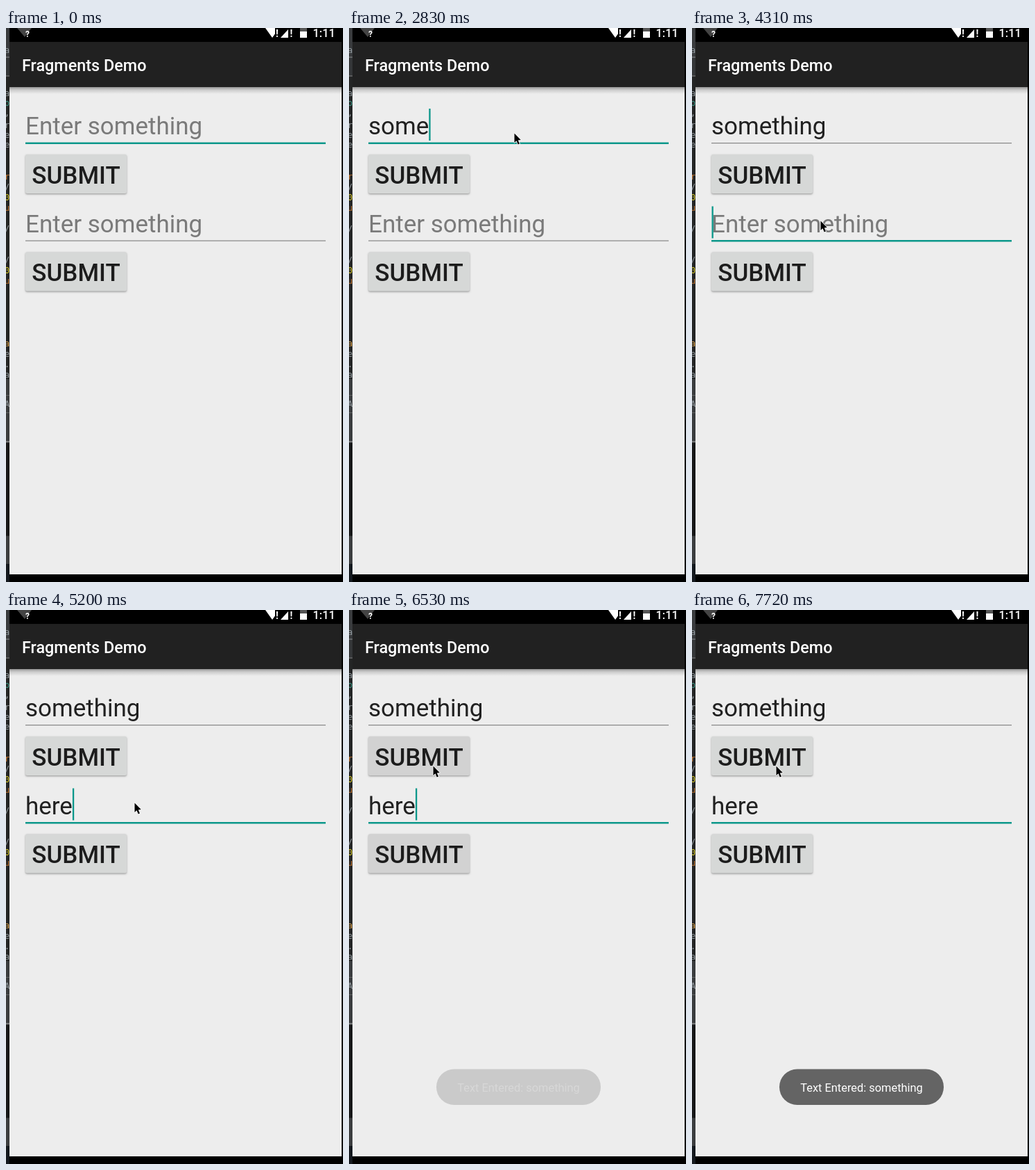
Write an HTML page with a canvas that moves like this. It is 486x797 px and loops after 8 s.

```html
<!DOCTYPE html>
<html lang="en">
<head>
<meta charset="utf-8">
<title>Fragments Demo</title>
<style>
  html, body { margin: 0; width: 100%; height: 100%; overflow: hidden; background: #000; }
  canvas { display: block; }
</style>
</head>
<body>
<canvas id="stage" width="486" height="797"></canvas>
<script>
const ctx = document.getElementById('stage').getContext('2d');
const LOOP = 8000;
const TEAL = '#0b978a';

// Step tracks: each entry holds from its time until the next one.
const pointer = [
  [0, null], [450, [317, 353]], [750, [298, 302]], [890, [258, 205]], [1040, [238, 151]],
  [3870, [226, 183]], [4020, [199, 246]], [4160, [185, 277]],
  [5790, [171, 262]], [5930, [136, 233]], [6080, [121, 224]]
];
const firstLength = [[0, 0], [2380, 1], [2530, 2], [2680, 3], [2830, 4], [2980, 6], [3120, 8], [3270, 9]];
const secondLength = [[0, 0], [4900, 1], [5050, 3], [5200, 4]];
const caretOn = [
  [0, false], [450, true], [890, false], [1340, true], [1940, false], [2380, true], [3720, false],
  [4310, true], [5640, false], [6080, true], [6680, false], [7130, true], [7720, false]
];
const toastAlpha = [[0, 0], [6530, 0.26], [6680, 0.66], [6830, 0.92], [6980, 1]];

const at = (track, t) => track.findLast(([start]) => start <= t)[1];

function rect(x, y, w, h, color) {
  ctx.fillStyle = color;
  ctx.fillRect(x, y, w, h);
}

function roundRect(x, y, w, h, r, color) {
  ctx.fillStyle = color;
  ctx.beginPath();
  ctx.roundRect(x, y, w, h, r);
  ctx.fill();
}

function polygon(points, color) {
  ctx.fillStyle = color;
  ctx.beginPath();
  points.forEach(([x, y]) => ctx.lineTo(x, y));
  ctx.closePath();
  ctx.fill();
}

function text(str, x, y, size, color, weight = 400, align = 'left', family = 'Roboto, sans-serif') {
  ctx.font = `${weight} ${size}px ${family}`;
  ctx.textAlign = align;
  ctx.fillStyle = color;
  ctx.fillText(str, x, y);
}

// Sliver of a code editor behind the phone window.
function drawEditor() {
  rect(0, 0, 5, 797, '#242525');
  rect(0, 0, 5, 41, '#393b3d');
  rect(0, 41, 5, 2, '#626466');
  rect(0, 43, 5, 25, '#343638');
  rect(0, 68, 5, 2, '#58595a');
  rect(0, 505, 5, 92, '#3a3c3e');
  rect(0, 528, 5, 1, '#606263');
  rect(0, 553, 5, 1, '#606263');
  rect(0, 594, 5, 2, '#747677');
  rect(0, 597, 5, 133, '#161718');
  rect(0, 731, 5, 40, '#3b3d3f');
  rect(0, 771, 5, 26, '#14191f');
  const gray = '#929a9f', orange = '#c77832', yellow = '#d2c52a';
  const glyphs = [
    ['a', 36, gray], ['a', 98, gray], ['o', 112, '#3c9a88'], [',', 126, gray], ['r', 144, gray],
    ['e', 158, gray], ['e', 172, gray], ['r', 218, orange], ['/', 233, gray], ['0', 248, yellow],
    ['u', 263, orange], ['/', 293, gray], ['/', 338, gray], ['0', 353, yellow], ['u', 368, orange],
    ['a', 458, '#d8a04c'], ['e', 473, gray], ['.', 488, gray], ['a', 503, gray], ['A', 545, gray]
  ];
  ctx.save();
  ctx.beginPath();
  ctx.rect(0, 0, 5, 797);
  ctx.clip();
  for (const [glyph, y, color] of glyphs) {
    text(glyph, -2, y, 12, color, 400, 'left', '"DejaVu Sans Mono", monospace');
  }
  ctx.restore();
}

function drawStatusBar() {
  rect(5, 0, 481, 20, '#000');
  polygon([[16, 0], [37, 0], [27, 13]], '#444');
  text('?', 28, 13, 12, '#fff', 700);
  polygon([[374, 0], [394, 0], [384, 14]], '#fff');
  rect(388, 0, 6, 14, '#000');
  text('!', 389, 13, 14, '#fff', 700);
  polygon([[407, 2], [407, 14], [396, 14]], '#fff');
  text('!', 409.5, 13, 14, '#fff', 700);
  rect(424, 0, 10, 5, '#555');
  rect(424, 5, 10, 9, '#fff');
  text('1:11', 442.5, 13, 16.4, '#fff', 500);
}

function drawField(y, value, focused, caret) {
  text(value || 'Enter something', 28, y + 37, 35, value ? '#212121' : '#7a7a7a');
  if (focused) rect(28, y + 48.5, 433, 2.5, TEAL);
  else rect(28, y + 49, 433, 1.2, '#868686');
  if (focused && caret) {
    rect(28 + (value ? ctx.measureText(value).width : 0.5), y, 2.3, 46, TEAL);
  }
}

function drawButton(y, color) {
  ctx.save();
  ctx.shadowColor = 'rgba(0,0,0,.35)';
  ctx.shadowBlur = 2.5;
  ctx.shadowOffsetY = 1.2;
  roundRect(28, y, 146, 56.3, 2.5, color);
  ctx.restore();
  text('SUBMIT', 101, y + 41.7, 35, '#1c1c1c', 500, 'center');
}

function drawRipple() {
  ctx.save();
  ctx.beginPath();
  ctx.rect(28, 182, 146, 56);
  ctx.clip();
  ctx.fillStyle = 'rgba(0,0,0,.07)';
  ctx.beginPath();
  ctx.arc(104, 224, 26, 0, Math.PI * 2);
  ctx.fill();
  ctx.restore();
}

function drawToast(alpha) {
  ctx.save();
  ctx.globalAlpha = alpha;
  roundRect(126, 660.5, 237, 51.5, 25.7, '#646464');
  text('Text Entered: something', 244.5, 693, 16.4, '#fff', 400, 'center');
  ctx.restore();
}

function drawPointer([x, y]) {
  ctx.save();
  ctx.translate(x, y);
  ctx.lineJoin = 'round';
  ctx.lineWidth = 1.6;
  ctx.strokeStyle = '#fff';
  polygon([[0.5, 0.5], [0.5, 14], [3.5, 11.2], [5.7, 16.5], [8, 15.5], [5.8, 10.4], [9.8, 10]], '#000');
  ctx.stroke();
  ctx.fill();
  ctx.restore();
}

function draw(t) {
  rect(0, 0, 486, 797, '#000');
  drawEditor();
  drawStatusBar();
  rect(5, 85, 479, 701, '#ededed');
  rect(5, 20, 479, 65, '#212121');
  const shadow = ctx.createLinearGradient(0, 85, 0, 95);
  shadow.addColorStop(0, 'rgba(0,0,0,.36)');
  shadow.addColorStop(0.4, 'rgba(0,0,0,.14)');
  shadow.addColorStop(1, 'rgba(0,0,0,0)');
  rect(5, 85, 479, 10, shadow);
  text('Fragments Demo', 23, 62, 23.4, '#fff', 500);

  const secondFocused = t >= 4310;
  const caret = at(caretOn, t);
  const buttonColor = t >= 6530 && t < 6680 ? '#d2d2d2' : '#d6d8d7';
  drawField(116, 'something'.slice(0, at(firstLength, t)), !secondFocused, caret);
  drawButton(181.8, buttonColor);
  drawField(256.5, 'here'.slice(0, at(secondLength, t)), secondFocused, caret);
  drawButton(322.3, buttonColor);
  if (t >= 6380 && t < 6530) drawRipple();
  drawToast(at(toastAlpha, t));

  const position = at(pointer, t);
  if (position) drawPointer(position);
}

const start = performance.now();
function tick() {
  draw((performance.now() - start) % LOOP);
  requestAnimationFrame(tick);
}
tick();
</script>
</body>
</html>
```
